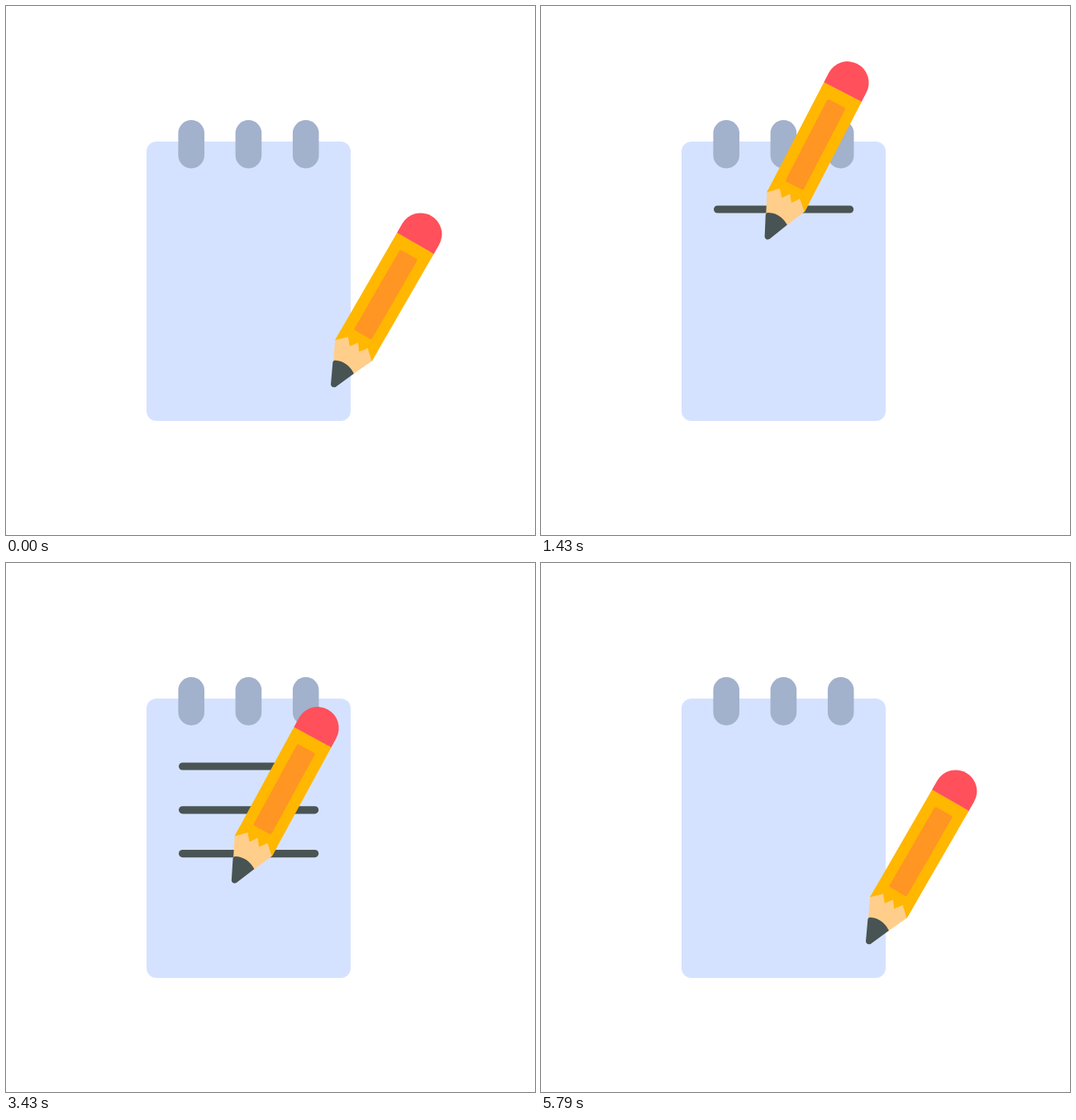
Animation, 640 px wide and 640 px high, one loop 6430 ms. Source, as an HTML page:

```html
<!DOCTYPE html>
<html lang="en">
<head>
<meta charset="utf-8">
<title>Notepad and pencil</title>
<style>
  html, body { margin: 0; width: 100%; height: 100%; overflow: hidden; background: #fff; }
  svg { display: block; width: 100%; height: 100%; }
</style>
</head>
<body>
<svg viewBox="0 0 640 640">
  <rect x="170" y="164" width="247" height="338" rx="12" fill="#d5e2ff"/>
  <g fill="#a2b1cc">
    <rect x="208.4" y="138" width="31.6" height="58.4" rx="15.8"/>
    <rect x="277.6" y="138" width="31.6" height="58.4" rx="15.8"/>
    <rect x="346.9" y="138" width="31.6" height="58.4" rx="15.8"/>
  </g>
  <g id="lines" stroke="#4a5454" stroke-width="9.2" stroke-linecap="round"></g>
  <!-- The pencil stands on its tip at 0,0 -->
  <g id="pencil">
    <path fill="#ffce8b" d="M-25.7-50V-64H25.7V-50L14-25H-14Z"/>
    <path fill="#ffb700" d="M-25.7-49.5L-14-61L-6.5-52L0-61L6.5-52L13.5-61L25.7-49.5V-200H-25.7Z"/>
    <rect x="-12.3" y="-184" width="24.6" height="112" rx="2" fill="#ff9522"/>
    <path fill="#ff505b" d="M-25.7-199.7V-212.3A25.7 25.7 0 0 1 25.7-212.3V-199.7Z"/>
    <path fill="#485353" d="M-3.2-.5L-14.6-25Q-15.4-27.5-13-28.5Q0-35 14.3-26L3.2-.8Q0 2.6-3.2-.5Z"/>
  </g>
</svg>
<script>
const LOOP = 6430, FPS = 14;
const LEFT = 213.6, RIGHT = 373.6, TOP = 246, GAP = 52.8;
const REST = { x: 395.5, y: 460, a: 30 };
const WIPE = [5400, 5770];

// Start and end time, start and end tilt of each stroke
const strokes = [
  [570, 1200, 20.5, 10],
  [1580, 2200, 38, 14],
  [2580, 3205, 38, 14],
  [3580, 4215, 38, 14],
  [4600, 5250, 35, 11]
].map(([t0, t1, a0, a1], i) => ({ t0, t1, a0, a1, y: TOP + GAP * i }));

const pencil = document.getElementById("pencil");
const group = document.getElementById("lines");
const lines = strokes.map(s => {
  const el = document.createElementNS("http://www.w3.org/2000/svg", "line");
  el.setAttribute("y1", s.y);
  el.setAttribute("y2", s.y);
  return group.appendChild(el);
});

const part = (t, a, b) => Math.min(1, Math.max(0, (t - a) / (b - a)));
const mix = (a, b, p) => a + (b - a) * p;
const bend = (a, c, b, p) => mix(mix(a, c, p), mix(c, b, p), p);

// Pencil stops, with the time it arrives at each
const stops = [{ t: 0, ...REST }];
for (const s of strokes) {
  const y = s.y + 2.5, first = s === strokes[0];
  const arrive = first ? 558 : stops[stops.length - 1].t + 368;
  stops.push({ t: arrive, x: LEFT - 1, y, a: s.a0 });
  stops.push({ t: s.t0, x: LEFT - 1, y, a: s.a0 });
  stops.push({ t: s.t1, x: RIGHT - 1, y, a: s.a1 });
}
stops.push({ t: 5770, ...REST });

function pose(t) {
  const i = stops.findIndex(s => s.t > t);
  if (i < 0) return REST;
  const from = stops[i - 1], to = stops[i], p = part(t, from.t, to.t);
  const a = mix(from.a, to.a, p);
  if (i === 1) {
    return { x: bend(from.x, 249, to.x, p), y: bend(from.y, 338, to.y, p), a };
  }
  return { x: mix(from.x, to.x, p), y: mix(from.y, to.y, p), a };
}

function draw(t) {
  const { x, y, a } = pose(t);
  pencil.setAttribute("transform", `translate(${x} ${y}) rotate(${a})`);
  const wiped = part(t, ...WIPE);
  strokes.forEach((s, i) => {
    const drawn = part(t, s.t0, s.t1);
    lines[i].setAttribute("x1", mix(LEFT, RIGHT, wiped));
    lines[i].setAttribute("x2", mix(LEFT, RIGHT, drawn));
    lines[i].style.display = drawn > wiped ? "" : "none";
  });
}

const start = performance.now();
function tick() {
  const t = (performance.now() - start) % LOOP;
  draw(Math.floor((t + 5) * FPS / 1000) * 1000 / FPS % LOOP);
  requestAnimationFrame(tick);
}
tick();
</script>
</body>
</html>
```
